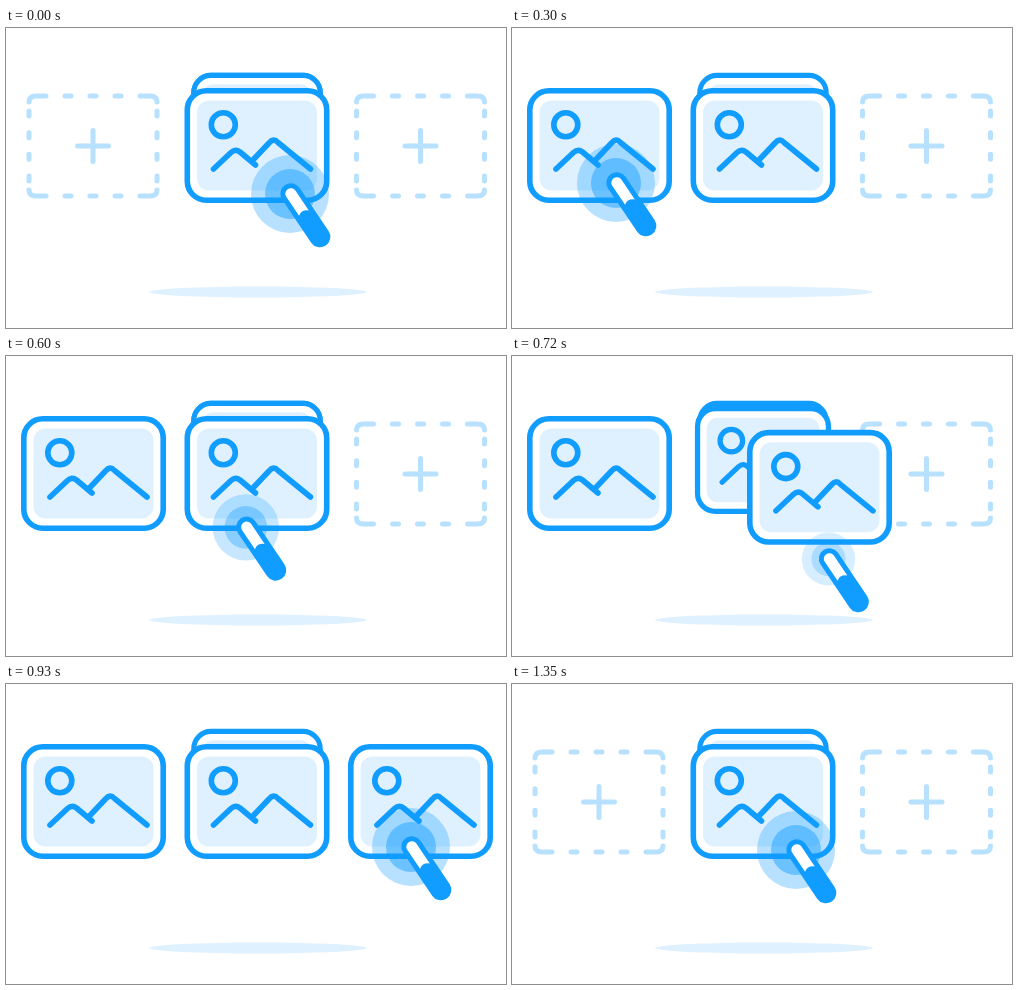
These frames come from a looping animation (500 by 300 pixels, 1500 ms). An HTML page:

```html
<!DOCTYPE html>
<html lang="en">
<head>
<meta charset="utf-8">
<title>Sorting cards</title>
<style>
  html, body { margin: 0; width: 100%; height: 100%; overflow: hidden; background: #fff; }
  svg { display: block; width: 100vw; height: 100vh; }
</style>
</head>
<body>
<svg viewBox="0 0 500 300" fill="none" stroke-linecap="round" stroke-linejoin="round">
  <defs>
    <!-- Card, 145 x 115, centred on the origin -->
    <g id="card" stroke="#119cff" stroke-width="5.6">
      <rect x="-69.7" y="-54.7" width="139.4" height="109.4" rx="19" fill="#fff"/>
      <rect x="-60" y="-45" width="120" height="90" rx="12" fill="#dff1ff" stroke="none"/>
      <circle cx="-33.7" cy="-20.7" r="12"/>
      <path d="M-43.5 23.5 L-26 7 Q-21.5 3 -17 6.5 L-1.5 19.5 M-5.5 16 L12 -2.5 Q16.5 -8 21 -3 L53.5 23.5"/>
    </g>
    <path id="corner" d="M-64 -44 Q-64 -50 -57 -50 H-47"/>
    <path id="edges" d="M-28 -50 h6 M-3 -50 h6 M22 -50 h6 M-64 -35 v5 M-64 -13.3 v5 M-64 8.3 v5 M-64 30 v5"/>
    <g id="slot" stroke="#b7e1ff" stroke-width="5">
      <use href="#corner"/>
      <use href="#corner" transform="scale(-1 1)"/>
      <use href="#corner" transform="scale(1 -1)"/>
      <use href="#corner" transform="scale(-1)"/>
      <use href="#edges"/>
      <use href="#edges" transform="scale(-1)"/>
      <path d="M-15.5 0 h31 M0 -15.5 v31"/>
    </g>
  </defs>
  <ellipse cx="252" cy="264" rx="109" ry="5.5" fill="#dff1ff"/>
  <use href="#slot" x="87" y="118"/>
  <use href="#slot" x="414.5" y="118"/>
  <use href="#card" transform="translate(251 97) scale(.907)"/>
  <use href="#card" id="next"/>
  <use href="#card" id="left"/>
  <use href="#card" id="right"/>
  <g id="pointer">
    <g id="halo" fill="#119cff">
      <circle r="39" opacity=".3"/>
      <circle r="25" opacity=".45"/>
    </g>
    <g transform="translate(.8 -.3) rotate(56)">
      <path d="M0 0 H52" stroke="#119cff" stroke-width="21"/>
      <path d="M24 -5.5 H0 A5.5 5.5 0 0 0 0 5.5 H23 Q19 0 24 -5.5" fill="#fff"/>
    </g>
  </g>
</svg>
<script>
const LOOP = 1500, STEP = 30;
const MIDDLE = 251, CARD_Y = 117.5, SHIFT = 163.5;
const [next, left, right, pointer, halo] =
  ['next', 'left', 'right', 'pointer', 'halo'].map(id => document.getElementById(id));

const progress = (t, from, to) => Math.min(1, Math.max(0, (t - from) / (to - from)));
const ease = p => (1 - Math.cos(Math.PI * p)) / 2;
const bump = p => Math.sin(Math.PI * p);
const place = (el, x, y, scale = 1) =>
  el.setAttribute('transform', `translate(${x} ${y}) scale(${scale})`);

// Pointer legs: start time, end time, start point, end point, downward sag
const legs = [
  [0, 300, 284, 166, 104, 155, 26],
  [300, 540, 104, 155, 228, 163, 0],
  [540, 900, 228, 163, 405, 163, 40],
  [1050, 1350, 405, 163, 284, 166, 1.5],
];

function pointerAt(t) {
  const [from, to, x0, y0, x1, y1, sag] = legs.findLast(leg => t >= leg[0]);
  const p = ease(progress(t, from, to));
  return [x0 + (x1 - x0) * p, y0 + (y1 - y0) * p + sag * bump(p)];
}

function draw(t) {
  const toLeft = ease(progress(t, 0, 300));
  const toRight = ease(progress(t, 600, 900));
  const secondDrag = t >= 540;
  const rise = secondDrag ? toRight : toLeft;
  const fade = 1 - ease(progress(t, 1050, 1290));

  place(next, MIDDLE, 97 + 20.5 * rise, .907 + .093 * rise);
  place(left, MIDDLE - SHIFT * toLeft, CARD_Y + 27 * bump(toLeft));
  place(right, MIDDLE + SHIFT * toRight, CARD_Y + 15.6 * bump(toRight));
  left.setAttribute('opacity', fade);
  right.setAttribute('opacity', secondDrag ? fade : 0);

  const press = .41 * bump(progress(t, 0, 300)) + .32 * bump(progress(t, 540, 930));
  place(pointer, ...pointerAt(t));
  place(halo, 0, 0, 1 - press);
  halo.setAttribute('opacity', 1 - 1.35 * press);
}

function frame(now) {
  draw(Math.floor(now % LOOP / STEP) * STEP);
  requestAnimationFrame(frame);
}
draw(0);
requestAnimationFrame(frame);
</script>
</body>
</html>
```
